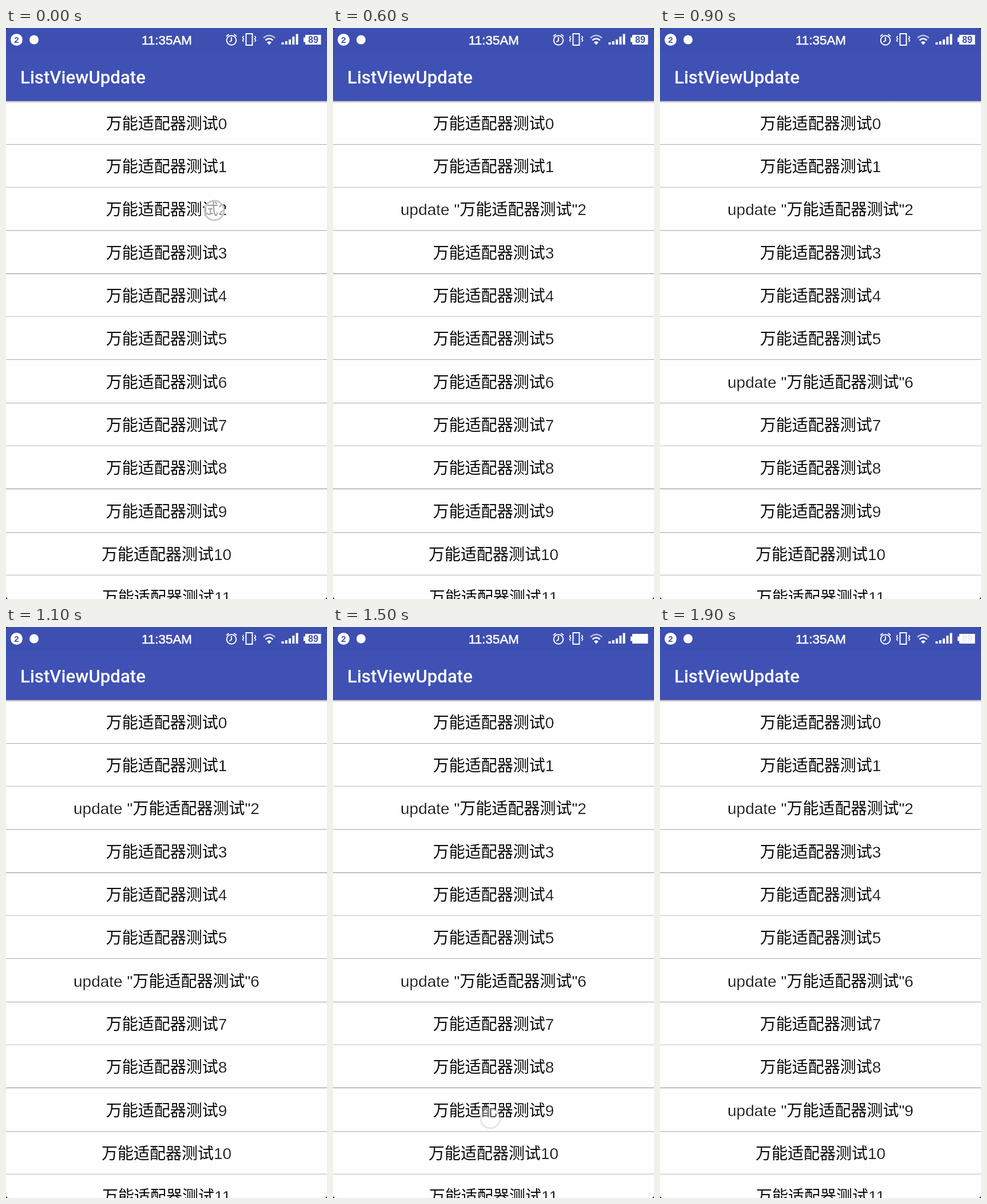
Recreate the animation shown at these times as an HTML page. Size 561 by 998 pixels, loop 2000 ms.

```html
<!DOCTYPE html>
<html lang="zh">
<head>
<meta charset="utf-8">
<title>ListViewUpdate</title>
<style>
  html, body { margin: 0; width: 100%; height: 100%; overflow: hidden; background: #fefefe; }
  svg { display: block; width: 561px; height: 998px; }
  .row { font: 28px "Liberation Sans", "Noto Sans CJK SC", "Noto Sans CJK", sans-serif; text-anchor: middle; fill: #080808; }
  .thin { stroke: #fefefe; stroke-width: .4px; }
  .title { font: 500 31.2px Roboto, sans-serif; fill: #fff; }
  .clock { font: 22.4px "Liberation Sans", sans-serif; fill: #fff; stroke: #fff; stroke-width: .6px; text-anchor: middle; }
  .badge { font: bold 15px "Liberation Sans", sans-serif; fill: #3d4fb1; text-anchor: middle; }
  .line { fill: none; stroke: #fff; stroke-width: 2px; }
</style>
</head>
<body>
<svg viewBox="0 0 561 998">
  <defs>
    <linearGradient id="shade" x2="0" y2="1">
      <stop offset="0" stop-color="#777" stop-opacity=".75"/>
      <stop offset="1" stop-color="#ccc" stop-opacity="0"/>
    </linearGradient>
  </defs>
  <rect width="561" height="998" fill="#fefefe"/>
  <g id="list"></g>
  <g id="touch">
    <circle r="17" fill="#fff" fill-opacity=".6"/>
    <circle r="17" fill="none" stroke="#c8c8c8" stroke-width="3"/>
  </g>

  <rect y="127" width="561" height="5" fill="url(#shade)"/>
  <rect width="561" height="127.5" fill="#3f51b5"/>
  <rect width="561" height="40" fill="#3d4fb1"/>
  <text class="title" x="25" y="96.5">ListViewUpdate</text>

  <circle cx="18.5" cy="20.5" r="10.5" fill="#fff"/>
  <text class="badge" x="18.5" y="26">2</text>
  <circle cx="49" cy="20.5" r="8" fill="#fff"/>
  <text class="clock" x="281" y="29">11:35AM</text>

  <g class="line">
    <circle cx="394" cy="21.5" r="8.3"/>
    <path d="M394 16V22L390.5 24.5M385 14.5L389.5 11M403 14.5L398.5 11"/>
    <rect x="419.5" y="10" width="11" height="20"/>
    <path d="M415.5 14l-2 2.5 2 2.5-2 2.5 2 2.5M434.5 14l2 2.5-2 2.5 2 2.5-2 2.5" stroke-width="1.6"/>
    <path d="M450 17.5Q460 8.5 470 17.5" stroke-width="2.4" opacity=".65"/>
    <path d="M453.5 21.5Q460 15.5 466.5 21.5" stroke-width="2.6"/>
  </g>
  <path d="M456 25Q460 21.5 464 25L460 29.5Z" fill="#fff"/>
  <path d="M481.5 25h4v4h-4zM487.8 23h4v6h-4zM494 20h4v9h-4zM500.3 15h4v14h-4zM506.6 10.5h4v18.5h-4z" fill="#fff"/>
  <path d="M523 12h27.5v17H523V24.5h-3v-8h3z" fill="#fff"/>
  <text id="charge" class="badge" x="537" y="26" style="font-size:16px">89</text>

  <path d="M0 0h3L0 3zM561 0v3l-3-3zM0 998v-3l3 3zM561 998h-3l3-3z" fill="#222"/>
</svg>
<script>
  const LOOP = 2000, STEP = 100, PITCH = 75.33;
  const LABEL = '万能适配器测试';
  const list = document.getElementById('list');
  const touch = document.getElementById('touch');
  const charge = document.getElementById('charge');
  const taps = [
    { row: 2, x: 364, y: 319, at: 0, fade: [1, .45] },
    { row: 6, x: 323, y: 619, at: 700, fade: [1, .55] },
    { row: 9, x: 275, y: 859, at: 1400, fade: [1, .45] }
  ];

  function add(tag, attrs) {
    const el = document.createElementNS('http://www.w3.org/2000/svg', tag);
    for (const key in attrs) el.setAttribute(key, attrs[key]);
    return list.appendChild(el);
  }

  // Dividers vary in tone because the rows fall between whole pixels.
  const tones = ['aaa', 'd2d2d2', 'c4c4c4', '8c8c8c', 'd2d2d2', 'a8a8a8',
                 'a4a4a4', 'd4d4d4', '888', 'c4c4c4', 'd0d0d0'];
  tones.forEach((tone, i) => add('rect', {
    y: Math.floor(203.1 + PITCH * i) - (tone[0] === 'd' ? .5 : 0),
    width: 561,
    height: tone[0] === 'd' || tone[0] === 'c' ? 1.6 : 1,
    fill: '#' + tone
  }));

  const thin = s => `<tspan class="thin">${s}</tspan>`;
  const plain = i => LABEL + thin(i);
  const updated = i => thin('update "') + LABEL + thin('"' + i);
  const rows = Array.from({ length: 12 }, (_, i) => {
    const el = add('text', { class: 'row', x: 280.5, y: 176.8 + PITCH * i });
    el.innerHTML = plain(i);
    return el;
  });

  function chargeAlpha(t) {
    if (t >= 1900) return .12;
    return Math.min(1, Math.max(0, (1500 - t) / 300));
  }

  let last = -1;
  function draw(time) {
    const t = Math.floor((time % LOOP) / STEP) * STEP;
    if (t === last) return;
    last = t;
    let alpha = 0;
    for (const tap of taps) {
      const age = (t - tap.at) / STEP;
      rows[tap.row].innerHTML = (age >= 2 ? updated : plain)(tap.row);
      if (age >= 0 && age < tap.fade.length) {
        alpha = tap.fade[age];
        touch.setAttribute('transform', `translate(${tap.x} ${tap.y})`);
      }
    }
    touch.setAttribute('opacity', alpha);
    charge.setAttribute('opacity', chargeAlpha(t));
  }

  const start = performance.now();
  function tick() {
    draw(performance.now() - start);
    requestAnimationFrame(tick);
  }
  tick();
</script>
</body>
</html>
```
